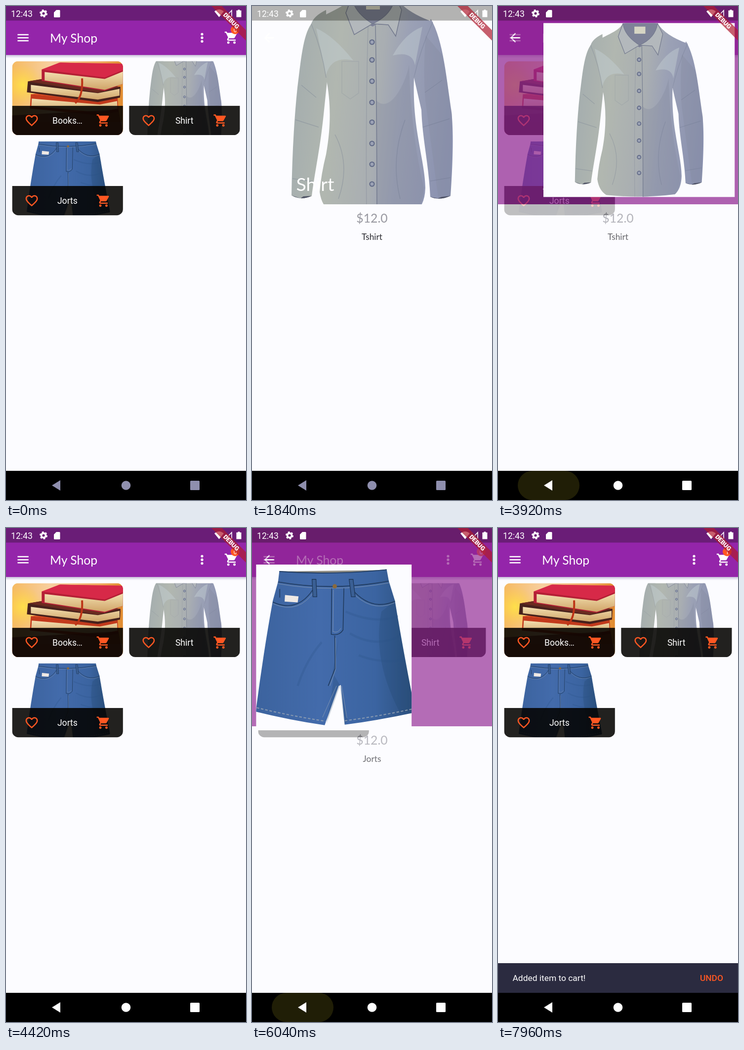
Write an HTML page that moves like this. It is 486 px wide and 999 px high and loops after 8000 ms.

```html
<!DOCTYPE html>
<html lang="en">
<head>
<meta charset="utf-8">
<title>My Shop</title>
<style>
html, body { margin: 0; width: 100%; height: 100%; overflow: hidden; background: #000; }
svg { display: block; }
#stage { width: 100vw; height: 100vh; }
text { font-family: Roboto, sans-serif; font-size: 17.6px; fill: #fff; }
.lato { font-family: Lato, sans-serif; }
.mid { text-anchor: middle; }
</style>
</head>
<body>
<svg id="stage" viewBox="0 0 486 999">
<defs>
  <path id="menu" d="M3 18h18v-2H3zM3 13h18v-2H3zM3 6v2h18V6z"/>
  <path id="back" d="M20 11H7.83l5.59-5.59L12 4l-8 8 8 8 1.41-1.41L7.83 13H20z"/>
  <path id="heart" d="M16.5 3c-1.74 0-3.41.81-4.5 2.09C10.91 3.81 9.24 3 7.5 3 4.42 3 2 5.42 2 8.5c0 3.78 3.4 6.86 8.55 11.54L12 21.35l1.45-1.32C18.6 15.36 22 12.28 22 8.5 22 5.42 19.58 3 16.5 3zm-4.4 15.55l-.1.1-.1-.1C7.14 14.24 4 11.39 4 8.5 4 6.5 5.5 5 7.5 5c1.54 0 3.04.99 3.57 2.36h1.87C13.46 5.99 14.96 5 16.5 5c2 0 3.5 1.5 3.5 3.5 0 2.89-3.14 5.74-7.9 10.05z"/>
  <path id="cart" d="M7 18a2 2 0 1 0 0 4 2 2 0 0 0 0-4zM1 2v2h2l3.6 7.59-1.35 2.45c-.16.28-.25.61-.25.96 0 1.1.9 2 2 2h12v-2H7.42c-.14 0-.25-.11-.25-.25l.93-1.75h7.45c.75 0 1.41-.41 1.75-1.03l3.58-6.49A1 1 0 0 0 20 4H5.21l-.94-2zM17 18a2 2 0 1 0 0 4 2 2 0 0 0 0-4z"/>

  <linearGradient id="cloth" gradientUnits="userSpaceOnUse" x1="0" x2="486" y1="180" y2="230">
    <stop offset=".16" stop-color="#a4adae"/><stop offset=".34" stop-color="#b1b7b0"/>
    <stop offset=".52" stop-color="#a9aeb2"/><stop offset=".62" stop-color="#9ba1b5"/>
    <stop offset=".84" stop-color="#8a91b0"/>
  </linearGradient>
  <linearGradient id="denim">
    <stop offset="0" stop-color="#3c639e"/><stop offset=".4" stop-color="#436bab"/>
    <stop offset=".75" stop-color="#3b64a1"/><stop offset="1" stop-color="#2b4f7c"/>
  </linearGradient>
  <linearGradient id="warm">
    <stop offset="0" stop-color="#f5ba62"/><stop offset=".35" stop-color="#f7cfa0"/>
    <stop offset=".8" stop-color="#f0a95c"/><stop offset="1" stop-color="#e08a2e"/>
  </linearGradient>
  <radialGradient id="glow"><stop offset="0" stop-color="#ffe04a"/><stop offset="1" stop-color="#ffd040" stop-opacity="0"/></radialGradient>
  <linearGradient id="paper" x2="0" y2="1"><stop offset="0" stop-color="#f3dfb0"/><stop offset="1" stop-color="#cfa468"/></linearGradient>
  <linearGradient id="shade" x2="0" y2="1"><stop offset="0" stop-color="#7a5c98" stop-opacity=".5"/><stop offset="1" stop-color="#a0a0d0" stop-opacity="0"/></linearGradient>

  <symbol id="shirt" viewBox="0 -42.5 486 486" preserveAspectRatio="xMidYMid slice">
    <rect y="-42.5" width="486" height="486" fill="#fcfcff"/>
    <path fill="#7e8298" d="M202-19Q245-29 290-19L284 25 244 42 206 22z"/>
    <rect x="231" y="-11" width="28" height="18" fill="#d6d5c4"/>
    <g fill="url(#cloth)">
      <path d="M150 8Q125 20 120 36C103 60 99 110 92 165Q82 260 80 383 100 394 121 384C128 330 138 290 146 210L153 143z"/>
      <path d="M362 26C388 70 394 150 404 215Q410 270 402 384 380 394 361 386C358 320 345 270 343 210L328 145z"/>
      <path d="M202-19C190 4 150 12 120 36L150 145C161 200 159 250 150 300Q140 340 137 376 141 405 160 416 250 425 334 414 350 400 351 368C350 310 324 250 328 145L366 32Q310 12 290-19L282 20 244 42 208 20z"/>
    </g>
    <path fill="#83899f" opacity=".35" d="M251 190C278 220 310 160 318 120Q322 260 348 368 345 402 334 414L252 421zM352 60Q346 130 351 190L377 386 402 384 405 220Q395 150 386 100z"/>
    <path fill="#c3cfd2" opacity=".45" d="M130 45Q165 60 205 110 160 100 150 140zM345 42Q310 55 285 100 325 90 330 120z"/>
    <g fill="#b3b8bc" stroke="#747a8e" stroke-width="1.5">
      <path d="M202-19Q206 12 244 36L207 58 190 14z"/><path d="M290-19Q284 18 244 36L276 38 291 61 303 8z"/>
    </g>
    <g fill="none" stroke="#697187" stroke-width="1.5">
      <path d="M250 39Q253 220 253 421" opacity=".75"/>
      <path d="M235 42Q230 220 232 420" opacity=".25"/>
      <path d="M182 112h34v64l-17 12-17-12z" opacity=".15"/>
      <path d="M150 145Q142 90 120 36M328 145Q340 90 366 32M82 349L124 355M361 354L402 347M88 230L135 245M100 160L130 185M346 245L400 228M350 175L385 150M168 260Q200 320 175 390M310 230Q280 310 300 390" opacity=".3"/>
    </g>
    <path d="M80 383Q100 394 121 384L104 385 98 389zM361 386Q380 394 402 384L384 386 376 389z" fill="#4f5365"/>
    <g id="buttons" fill="#9aa1b4" stroke="#5d6684" stroke-width="2"></g>
  </symbol>

  <symbol id="jorts" viewBox="0 22 486 380" preserveAspectRatio="xMidYMid slice">
    <rect x="-20" y="22" width="526" height="380" fill="#fcfcff"/>
    <path fill="#8d8a80" d="M130 38L355 35 340 54Q240 72 150 54z"/>
    <path fill="url(#denim)" d="M118 37Q238 46 364 33L369 60 383 105Q402 220 429 356L428 361Q350 378 268 389L259 298 254 300 222 390Q140 378 64 359L65 350Q82 220 103 105L115 62z"/>
    <path fill="#1f3f66" opacity=".22" d="M383 105Q402 220 429 356L395 362Q330 240 352 130zM254 190L240 270 258 300 275 380 267 389 257 300 226 387 236 330z"/>
    <g fill="none" stroke="#203a5c" stroke-width="1.8">
      <path d="M115 62Q240 84 369 60M118 38Q238 47 364 34M238 76L237 182Q255 186 264 172L266 76M245 185L246 260 230 300M103 108Q160 134 196 78M383 106Q328 130 284 78M119 98V78"/>
    </g>
    <g fill="none" stroke="#9ba7b5" stroke-width="1" opacity=".75">
      <path d="M115 66Q240 88 370 64M242 80L241 176Q253 180 259 168M104 112Q164 138 200 80M382 110Q326 134 280 80M247 190V262L234 300M249 300L217 372M261 300L273 374"/>
      <path stroke-width="2.5" stroke-dasharray="6 4" d="M66 350Q140 368 224 381M268 380Q350 369 428 352"/>
    </g>
    <path fill="none" stroke="#284f83" stroke-width="5" opacity=".25" d="M270 130Q340 160 390 140M280 180Q340 215 395 185M300 230Q350 250 405 240M215 200Q180 240 160 300"/>
    <g fill="#3a5f94" stroke="#1d3658" stroke-width="1.5">
      <path d="M193 56h9l2 40h-9zM278 56h9l5 40h-9z"/>
    </g>
    <circle cx="245" cy="72" r="5" fill="#8a6a3c"/>
    <path fill="#efe9e4" d="M131 92L162 95 160 109 130 107z"/>
  </symbol>

  <symbol id="books" viewBox="12 112 225 150" preserveAspectRatio="xMidYMid slice">
    <rect x="12" y="112" width="225" height="150" fill="url(#warm)"/>
    <circle cx="34" cy="160" r="42" fill="url(#glow)"/>
    <path fill="#f0b070" d="M12 235h225v27H12z"/>
    <path fill="#c23a1c" d="M50 179L190 192 226 186 228 214 190 222 48 208z"/>
    <path fill="url(#paper)" d="M52 188L190 200 225 193 226 208 190 216 51 203z"/>
    <path fill="#d8481f" d="M50 179L120 172 226 186 190 194z"/>
    <path fill="#46211c" d="M44 153L80 147 232 164 231 186 186 195 42 175z"/>
    <path fill="url(#paper)" d="M50 160L186 177 230 168 230 182 186 190 50 173z"/>
    <path fill="#6b2a20" d="M44 153L80 147 232 164 186 176z"/>
    <path fill="#b41f35" d="M72 129L110 115 237 118V158L200 172 72 152z"/>
    <path fill="url(#paper)" d="M78 134L200 148 237 133V158L200 170 78 151z"/>
    <path fill="#d72948" d="M72 129L108 115 237 117V130L200 145z"/>
    <path fill="none" stroke="#bd3417" stroke-width="4" d="M154 147Q156 184 140 197"/>
    <path fill="#7c1f16" d="M12 222L228 210 237 262H12z" opacity=".7"/>
  </symbol>
  <clipPath id="clip"></clipPath>
</defs>

<g id="shop">
  <rect width="486" height="940" fill="#fcfcff"/>
  <rect y="98" width="486" height="8" fill="url(#shade)"/>
  <rect width="486" height="99" fill="#9425aa"/>
  <use href="#menu" fill="#fff" transform="translate(19.7 49.3)scale(1.238)"/>
  <text x="89" y="74" class="lato" style="font-size:24.75px">My Shop</text>
  <g fill="#fff"><circle cx="397" cy="57" r="2.6"/><circle cx="397" cy="64.2" r="2.6"/><circle cx="397" cy="71.5" r="2.6"/></g>
  <use href="#cart" fill="#fff" transform="translate(441.6 49.2)scale(1.238)"/>
  <circle cx="464" cy="48" r="9" fill="#ff5722"/>
  <text id="count" x="464" y="52.5" class="mid" style="font-size:12px">0</text>
  <g id="cards"></g>
  <g id="snack">
    <rect width="486" height="62" fill="#2b2b40"/>
    <g id="note"><text x="29.5" y="36" style="font-size:17.4px">Added item to cart!</text>
    <text x="456" y="36" text-anchor="end" style="font-size:17.4px;font-weight:500;fill:#ff5722">UNDO</text></g>
  </g>
</g>

<g id="detail">
  <rect width="486" height="940" fill="#fcfcff"/>
  <rect width="486" height="401" fill="#912693"/>
  <use id="cover" width="486" height="401"/>
  <use href="#back" fill="#fff" transform="translate(19.7 49.3)scale(1.238)"/>
  <text id="name" x="89.5" y="374" class="lato" style="font-size:37.4px"></text>
  <text x="243" y="438" class="lato mid" style="font-size:24.75px;fill:#9898a0">$12.0</text>
  <text id="about" x="243" y="473" class="lato mid" style="font-size:17.33px;fill:#2c2c32"></text>
</g>
<use id="hero"/>

<rect y="940" width="486" height="59" fill="#000"/>
<rect id="ripple" y="940" height="59" rx="29.5" fill="#201e06"/>
<g id="nav"><path d="M93 969.5L110 959V980z"/><circle cx="243" cy="969.5" r="9.3"/><rect x="373" y="960" width="19" height="19" rx="1.5"/></g>

<rect width="486" height="29.5" fill="#0c0c00" opacity=".3"/>
<text x="10" y="21.8">12:43</text>
<g fill="#fff">
  <circle cx="76" cy="15" r="4.4" fill="none" stroke="#fff" stroke-width="3.6"/>
  <circle cx="76" cy="15" r="6.6" fill="none" stroke="#fff" stroke-width="2.8" stroke-dasharray="3.6 3.31"/>
  <path d="M102 8h6q1.5 0 1.5 1.5v12q0 1.5-1.5 1.5h-9.5q-1.5 0-1.5-1.5V13z"/>
  <path d="M422 11Q431.5 3 441 11L431.5 22.5z"/>
  <path d="M445 21.5L457 9V21.5z" fill="none" stroke="#fff" stroke-width="1.6"/><path d="M445 22L452 14.5V22z"/>
  <path d="M469.5 7.5h4V9h3v13.5h-10V9h3z"/>
</g>
<g transform="translate(486 0)rotate(45)">
  <rect x="-60" y="34.6" width="120" height="14.9" fill="#b01c30" opacity=".7"/>
  <text y="46.5" class="mid" style="font-size:12.4px;font-weight:900">DEBUG</text>
</g>
</svg>
<script>
const LOOP = 8000, FADE = 300, SNACK = 7150, NAV_LIT = 2560;
const FULL = { x: 0, y: 0, w: 486, h: 401 };
const W = 224.5, H = 149.5;
const items = {
  books: { x: 12.4, y: 111.6, label: 'Books…' },
  shirt: { x: 249.2, y: 111.6, label: 'Shirt', about: 'Tshirt' },
  jorts: { x: 12.4, y: 273.7, label: 'Jorts', about: 'Jorts' }
};
const visits = [
  { id: 'shirt', push: 1500, pop: 3837 },
  { id: 'jorts', push: 4745, pop: 5942 }
];

const $ = id => document.getElementById(id);
const set = (id, attrs) => { for (const k in attrs) $(id).setAttribute(k, attrs[k]); };
const clamp = v => Math.min(1, Math.max(0, v));
const show = (id, on) => { $(id).style.display = on ? '' : 'none'; };

$('buttons').innerHTML = [73, 109, 152, 195, 235, 278, 320, 360]
  .map(y => `<circle cx="243" cy="${y}" r="4.5"/>`).join('');
$('clip').innerHTML = `<rect width="${W}" height="${H}" rx="12.4"/>`;
$('cards').innerHTML = Object.entries(items).map(([id, c]) => `
  <g transform="translate(${c.x} ${c.y})"><g clip-path="url(#clip)">
    <use id="thumb-${id}" href="#${id}" width="${W}" height="${H}"/>
    <rect y="90.3" width="${W}" height="60" fill="#040300" opacity=".88"/>
    <g fill="#ff5722">
      <use href="#heart" transform="translate(24.8 105.2)scale(1.238)"/>
      <use href="#cart" transform="translate(170 105.2)scale(1.238)"/>
    </g>
    <text x="112" y="126.3" class="mid">${c.label}</text>
  </g></g>`).join('');

// cubic-bezier(.4, 0, .2, 1)
function ease(x) {
  let lo = 0, hi = 1, s = 0.5;
  for (let i = 0; i < 24; i++) {
    s = (lo + hi) / 2;
    const bx = 1.2 * s * (1 - s) ** 2 + 0.6 * s * s * (1 - s) + s ** 3;
    if (bx < x) lo = s; else hi = s;
  }
  return s * s * (3 - 2 * s);
}

// Point on a circular arc whose tangent is axis-aligned at one end
function arc([ax, ay], [bx, by], t) {
  const dx = bx - ax, dy = by - ay, d2 = dx * dx + dy * dy;
  const wide = Math.abs(dx) >= Math.abs(dy);
  const r = d2 / (2 * Math.abs(wide ? dy : dx));
  const sweep = 2 * Math.asin(Math.sqrt(d2) / (2 * r));
  if (wide) {
    const a = sweep * t;
    return [ax + Math.sign(dx) * r * Math.sin(a), ay + Math.sign(dy) * r * (1 - Math.cos(a))];
  }
  const a = sweep * (1 - t);
  return [bx - Math.sign(dx) * r * (1 - Math.cos(a)), by - Math.sign(dy) * r * Math.sin(a)];
}

// Moves two opposite corners, picked by the direction of travel
function arcRect(a, b, t) {
  const dx = b.x + b.w / 2 - a.x - a.w / 2, dy = b.y + b.h / 2 - a.y - a.h / 2;
  const right = dx > 0 ? 1 : 0, down = dy > 0 ? 1 : 0;
  const corner = (q, i, j) => [q.x + i * q.w, q.y + j * q.h];
  const p = arc(corner(a, right, down), corner(b, right, down), t);
  const q = arc(corner(a, 1 - right, 1 - down), corner(b, 1 - right, 1 - down), t);
  return {
    x: Math.min(p[0], q[0]), y: Math.min(p[1], q[1]),
    width: Math.abs(p[0] - q[0]), height: Math.abs(p[1] - q[1])
  };
}

function drawVisit(t) {
  const v = visits.find(v => t >= v.push && t < v.pop + FADE);
  for (const id in items) show('thumb-' + id, !v || v.id !== id);
  show('detail', v);
  show('hero', false);
  if (!v) return;

  const item = items[v.id], thumb = { x: item.x, y: item.y, w: W, h: H };
  const popping = t >= v.pop;
  const k = clamp((t - (popping ? v.pop : v.push)) / FADE);
  const flying = k < 1;
  set('detail', { opacity: popping ? 1 - k : k });
  set('cover', { href: '#' + v.id });
  show('cover', !flying);
  $('name').textContent = item.label;
  $('about').textContent = item.about;
  if (flying) {
    show('hero', true);
    const r = popping ? arcRect(FULL, thumb, ease(k)) : arcRect(thumb, FULL, ease(k));
    set('hero', { href: '#' + v.id, ...r });
  }
}

function drawRipple(t) {
  const v = visits.find(v => t >= v.pop - 40 && t < v.pop + 350);
  show('ripple', v);
  if (!v) return;
  const w = 125 * (0.4 + 0.6 * clamp((t - v.pop + 40) / 100));
  set('ripple', { x: 102.5 - w / 2, width: w, opacity: 1 - clamp((t - v.pop - 200) / 150) });
}

function drawSnack(t) {
  const k = clamp((t - SNACK) / 250);
  show('snack', k > 0);
  set('snack', { transform: `translate(0 ${940 - 60 * ease(k)})` });
  set('note', { opacity: clamp((k - 0.4) / 0.6) });
  $('count').textContent = t < SNACK ? 0 : 1;
}

function draw(t) {
  drawVisit(t);
  drawRipple(t);
  drawSnack(t);
  set('nav', { fill: t < NAV_LIT ? '#8f8fae' : '#fff' });
}

function tick() {
  draw(performance.now() % LOOP);
  requestAnimationFrame(tick);
}
tick();
</script>
</body>
</html>
```
